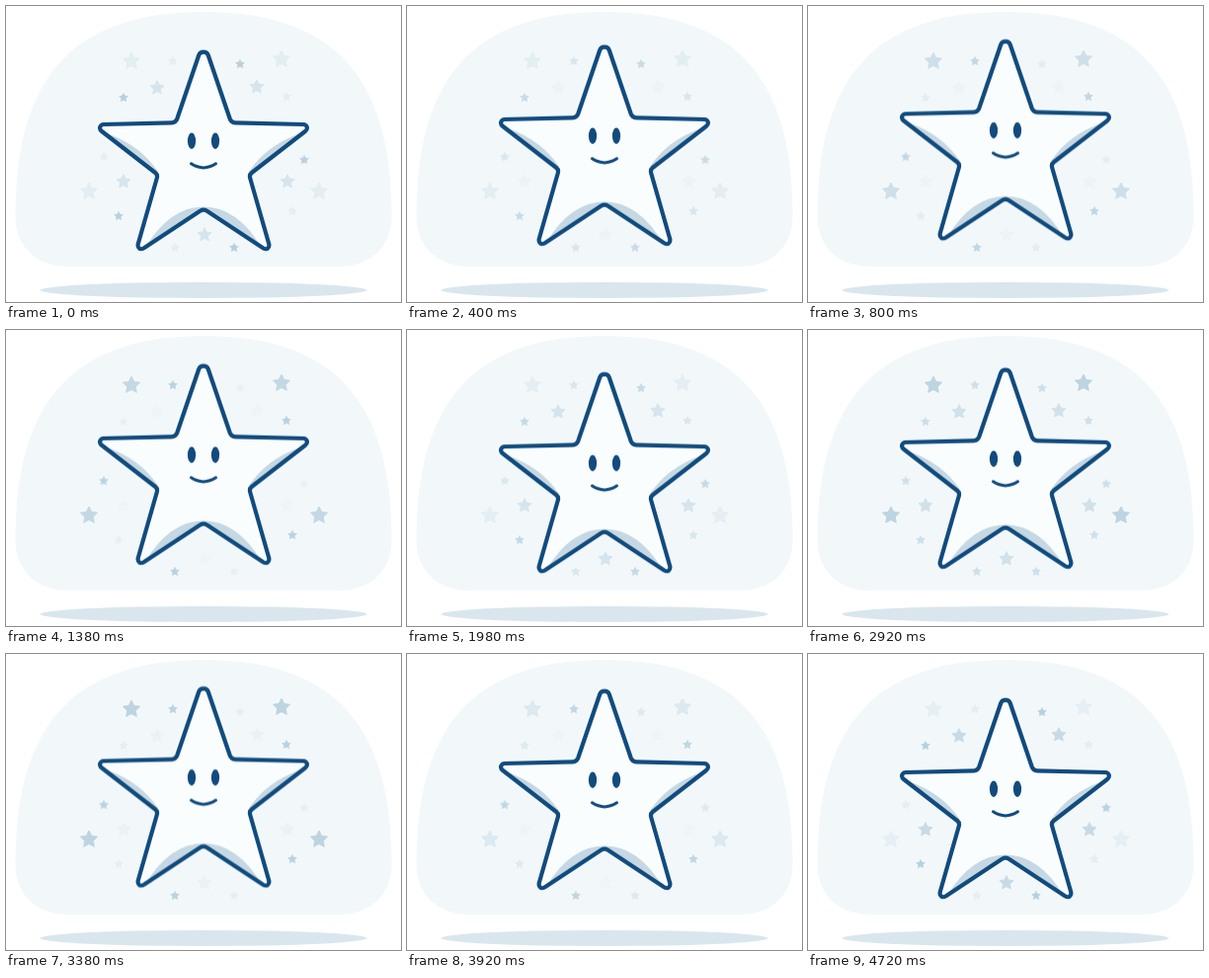
These frames come from a looping animation (400 px wide and 300 px high, 4740 ms). An HTML page without scripts:

```html
<!DOCTYPE html>
<html lang="en">
<head>
<meta charset="utf-8">
<title>Smiling star</title>
<style>
  html, body { margin: 0; width: 100%; height: 100%; overflow: hidden; background: #fff; }
  svg { display: block; width: 100%; height: 100%; }

  .hero, .sparkles g {
    animation: 4740ms cubic-bezier(.37, 0, .63, 1) infinite;
  }
  .sparkles { fill: #b8d0df; stroke: #b8d0df; stroke-linejoin: round; }
  .hero { animation-name: hover; }
  .sparkles .large { animation-name: glow-large; }
  .sparkles .small { animation-name: glow-small; }
  .sparkles .counter { animation-name: glow-counter; }
  .sparkles .medium { animation-name: glow-medium; }

  @keyframes hover {
    0% { transform: translateY(0); animation-timing-function: cubic-bezier(.3, .15, .6, 1); }
    22.6%, 74.3% { transform: translateY(-12px); }
    48.4%, 100% { transform: translateY(0); }
  }
  @keyframes glow-large {
    0%, 9% { opacity: .26; }
    25%, 66% { opacity: 1; }
    37%, 46% { opacity: .25; }
    90%, 100% { opacity: .22; }
  }
  @keyframes glow-small {
    0%, 49.5%, 100% { opacity: .25; }
    25%, 75.5% { opacity: 1; }
  }
  @keyframes glow-counter {
    0%, 49.5%, 100% { opacity: 1; }
    21%, 28%, 75.5% { opacity: .18; }
  }
  @keyframes glow-medium {
    0% { opacity: .48; }
    8% { opacity: .1; }
    30%, 76%, 83% { opacity: .07; }
    52% { opacity: .85; }
    100% { opacity: .75; }
  }
</style>
</head>
<body>
<svg viewBox="0 0 400 300" role="img" aria-label="Smiling star">
  <defs>
    <path id="spark" d="M0-9 2.7-3.7 8.6-2.8 4.3 1.4 5.3 7.3 0 4.5-5.3 7.3-4.3 1.4-8.6-2.8-2.7-3.7Z"/>
    <use id="spark-m" href="#spark" transform="scale(.82)"/>
    <use id="spark-s" href="#spark" transform="scale(.52)"/>
    <path id="body" d="M195.2 50C196.5 45.6 203.5 45.6 204.8 50L226.8 114.5Q228.200 118.200 232 118.300L301 120C305 120.200 306.300 124.500 303 127L248.800 169Q246.200 171 247.200 174.500L266.200 241C267.200 245.500 263.700 247.500 260.200 245.300L203.500 207.700Q200 205.700 196.500 207.700L139.800 245.300C136.300 247.500 132.800 245.500 133.800 241L152.800 174.500Q153.800 171 151.200 169L97 127C93.700 124.500 95 120.200 99 120L168 118.300Q171.800 118.200 173.200 114.500Z"/>
    <path id="arm-shade" d="M102 129Q136 141 154 168L151 169Z"/>
  </defs>

  <path fill="#f2f8fa" d="M62 264C30 264 9.500 243 9.500 213C9.500 84 57 6 200 6C343 6 390.500 84 390.500 213C390.500 243 370 264 338 264Z"/>
  <ellipse cx="200" cy="288" rx="165.500" ry="8" fill="#dae6ee"/>

  <g class="sparkles">
    <g class="large">
      <use href="#spark" x="127" y="56"/>
      <use href="#spark" x="279" y="54"/>
      <use href="#spark" x="84" y="188"/>
      <use href="#spark" x="317" y="188"/>
    </g>
    <g class="small">
      <use href="#spark-s" x="169" y="56"/>
      <use href="#spark-s" x="284" y="92"/>
      <use href="#spark-s" x="99" y="153"/>
      <use href="#spark-s" x="290" y="208"/>
      <use href="#spark-s" x="171" y="245"/>
    </g>
    <g class="counter">
      <use href="#spark-s" x="237" y="59"/>
      <use href="#spark-s" x="119" y="93"/>
      <use href="#spark-s" x="302" y="156"/>
      <use href="#spark-s" x="114" y="213"/>
      <use href="#spark-s" x="231" y="245"/>
    </g>
    <g class="medium">
      <use href="#spark-m" x="153" y="83"/>
      <use href="#spark-m" x="254" y="82"/>
      <use href="#spark-m" x="119" y="178"/>
      <use href="#spark-m" x="285" y="178"/>
      <use href="#spark-m" x="201" y="232"/>
    </g>
  </g>

  <g class="hero">
    <use href="#body" fill="#fafdfe"/>
    <g fill="#c5d8e3">
      <use href="#arm-shade"/>
      <use href="#arm-shade" transform="matrix(-1 0 0 1 400 0)"/>
      <path d="M141 245Q166 203.500 200 203.500T259 245L200 207Z"/>
    </g>
    <use href="#body" fill="none" stroke="#114b7e" stroke-width="4.200" stroke-linejoin="round"/>
    <g fill="#114b7e">
      <ellipse cx="188" cy="136.800" rx="4.100" ry="8.200"/>
      <ellipse cx="212" cy="136.800" rx="4.100" ry="8.200"/>
    </g>
    <path d="M187.500 159.800Q200 168 212.500 159.800" fill="none" stroke="#114b7e" stroke-width="3" stroke-linecap="round"/>
  </g>
</svg>
</body>
</html>
```
